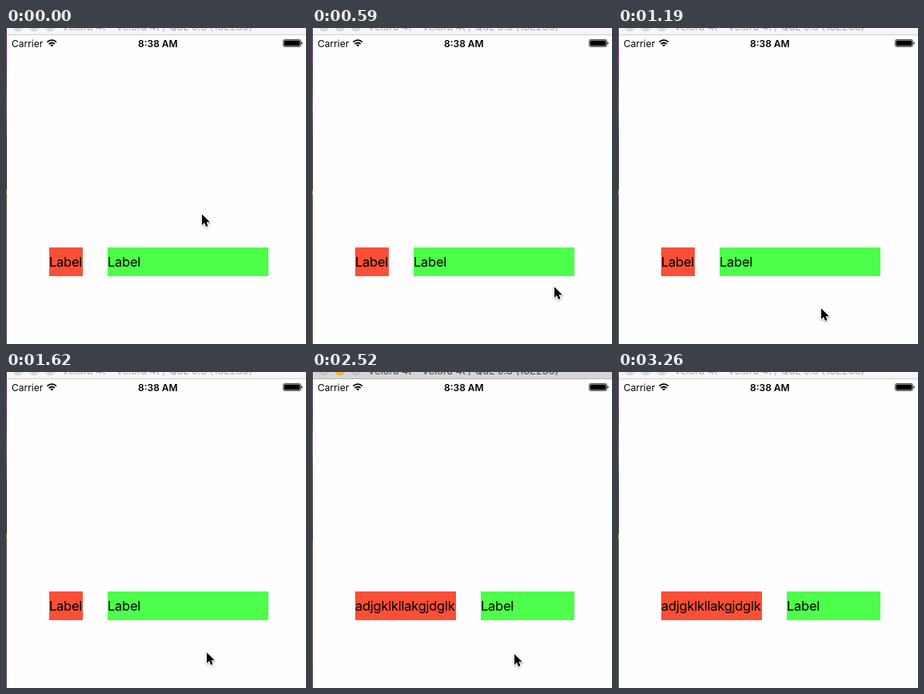
Recreate the animation shown at these times as an HTML page. Size 375 px wide and 396 px high, loop 3360 ms.

```html
<!DOCTYPE html>
<html lang="en">
<head>
<meta charset="utf-8">
<title>Label layout demo</title>
<style>
  html, body { margin: 0; width: 100%; height: 100%; overflow: hidden; background: #fefefe; }
  svg { display: block; width: 375px; height: 396px; }
  text { font-family: Inter, Roboto, "Liberation Sans", sans-serif; white-space: pre; }
  .status { font-size: 12px; }
  .clock { font-weight: 600; }
  .label { font-size: 16.5px; letter-spacing: -0.26px; }
  .title { font-size: 12.8px; }
</style>
</head>
<body>
<svg viewBox="0 0 375 396" xmlns="http://www.w3.org/2000/svg">
  <defs>
    <linearGradient id="idleEdge" x1="0" y1="0" x2="0" y2="1">
      <stop offset="0" stop-color="#3a3038"/>
      <stop offset=".07" stop-color="#5c1a62"/>
      <stop offset=".11" stop-color="#6d2470"/>
      <stop offset=".13" stop-color="#2c2a33"/>
      <stop offset=".25" stop-color="#55505c"/>
      <stop offset=".35" stop-color="#2d211e"/>
      <stop offset=".51" stop-color="#29221f"/>
      <stop offset=".52" stop-color="#a49a3c"/>
      <stop offset=".53" stop-color="#4c463c"/>
      <stop offset="1" stop-color="#4b443c"/>
    </linearGradient>
    <linearGradient id="activeEdge" x1="0" y1="0" x2="0" y2="1">
      <stop offset="0" stop-color="#2e282e"/>
      <stop offset=".09" stop-color="#5a2260"/>
      <stop offset=".13" stop-color="#2c2a33"/>
      <stop offset=".22" stop-color="#5b5963"/>
      <stop offset=".36" stop-color="#4a3026"/>
      <stop offset=".53" stop-color="#2a2422"/>
      <stop offset=".54" stop-color="#4c463c"/>
      <stop offset="1" stop-color="#403a34"/>
    </linearGradient>
    <filter id="shadow" x="-50%" y="-50%" width="220%" height="220%">
      <feDropShadow dx="0" dy="1" stdDeviation=".9" flood-color="#000" flood-opacity=".4"/>
    </filter>
  </defs>

  <rect width="375" height="396" fill="#fefefe"/>
  <rect id="bar" x="1" width="374" height="8"/>
  <rect id="rule" x="1" y="8" width="374" height="1"/>
  <g id="buttons" stroke-width="1">
    <circle cx="15" cy="-2" r="5.8"/>
    <circle cx="35" cy="-2" r="5.8"/>
    <circle cx="55" cy="-2" r="5.8"/>
  </g>
  <text id="title" class="title" x="70" y="3">Velora 4t - Velora 4t / QuL 9.3 (13E230)</text>
  <rect id="edge" width="1" height="396"/>

  <text class="status" x="7" y="23.5">Carrier</text>
  <g fill="none" stroke="#000" stroke-width="1.8">
    <path d="M51.4 17.6Q57.2 12.6 63 17.6"/>
    <path d="M53.6 20Q57.2 17 60.8 20"/>
    <path d="M55.2 21.3Q57.2 19.7 59.2 21.3L57.2 23.5Z" fill="#000" stroke="none"/>
  </g>
  <text class="status clock" x="165" y="23.5">8:38 AM</text>
  <rect x="346.5" y="14.5" width="22" height="9" rx="1.8" fill="none" stroke="#333" stroke-width=".8"/>
  <rect x="347.5" y="15.5" width="20" height="7" rx=".8"/>
  <path d="M369.4 17.3q1.3.4 1.3 1.7t-1.3 1.7z"/>

  <rect id="red" x="54" y="275" height="36" fill="#fb4f38"/>
  <rect id="green" y="275" height="36" fill="#4dff4a"/>
  <text id="redText" class="label" x="54" y="299"></text>
  <text id="greenText" class="label" y="299">Label</text>

  <g id="cursor" filter="url(#shadow)">
    <path d="M0 .5V14L3.1 11.1 5.1 16 7.5 15 5.5 10.2H9.8Z"
          fill="#000" stroke="#fff" stroke-width="1.6" paint-order="stroke"/>
  </g>
</svg>
<script>
const LOOP = 3360;
const TEXT_CHANGE = 2070;
const FOCUS_END = 3260;
const RIGHT_EDGE = 328;

// Pointer tip: [start ms, x, y]
const pointer = [
  [0, 245, 233], [150, 277, 241], [300, 308, 264], [450, 315, 294],
  [590, 303, 324], [740, 280, 341], [890, 264, 347], [1040, 258, 350],
  [1190, 254, 351], [1330, 253, 351], [1480, 252, 351], [1620, 251, 351],
  [2520, 253, 353], [2660, 275, 364], [2810, 316, 391], [2960, 316, 420]
];

const el = id => document.getElementById(id);
const set = (node, attrs) => {
  for (const name in attrs) node.setAttribute(name, attrs[name]);
};
const buttons = [...el("buttons").children];

function drawWindow(active) {
  set(el("bar"), { fill: active ? "#d6d6d6" : "#f6f6f6" });
  set(el("rule"), { fill: active ? "#b3b3b3" : "#d0d0d0" });
  set(el("title"), { fill: active ? "#444" : "#aaa" });
  set(el("edge"), { fill: `url(#${active ? "activeEdge" : "idleEdge"})` });
  buttons.forEach((button, i) => {
    const lit = active && i === 1;
    set(button, {
      fill: lit ? "#fdbc2f" : active ? "#cbcbcb" : "#dadada",
      stroke: lit ? "#e0a028" : active ? "#b8b8b8" : "#d0d0d0"
    });
  });
}

function drawLabels(long) {
  const redWidth = long ? 126 : 42;
  const greenX = 54 + redWidth + 31;
  set(el("red"), { width: redWidth });
  set(el("green"), { x: greenX, width: RIGHT_EDGE - greenX });
  set(el("greenText"), { x: greenX });
  el("redText").textContent = long ? "adjgklkllakgjdglk" : "Label";
}

function render(time) {
  const t = time % LOOP;
  const [, x, y] = pointer.filter(step => step[0] <= t).pop();
  drawWindow(t >= TEXT_CHANGE && t < FOCUS_END);
  drawLabels(t >= TEXT_CHANGE);
  set(el("cursor"), { transform: `translate(${x} ${y})` });
}

const start = performance.now();
function tick() {
  render(performance.now() - start);
  requestAnimationFrame(tick);
}
tick();
</script>
</body>
</html>
```
